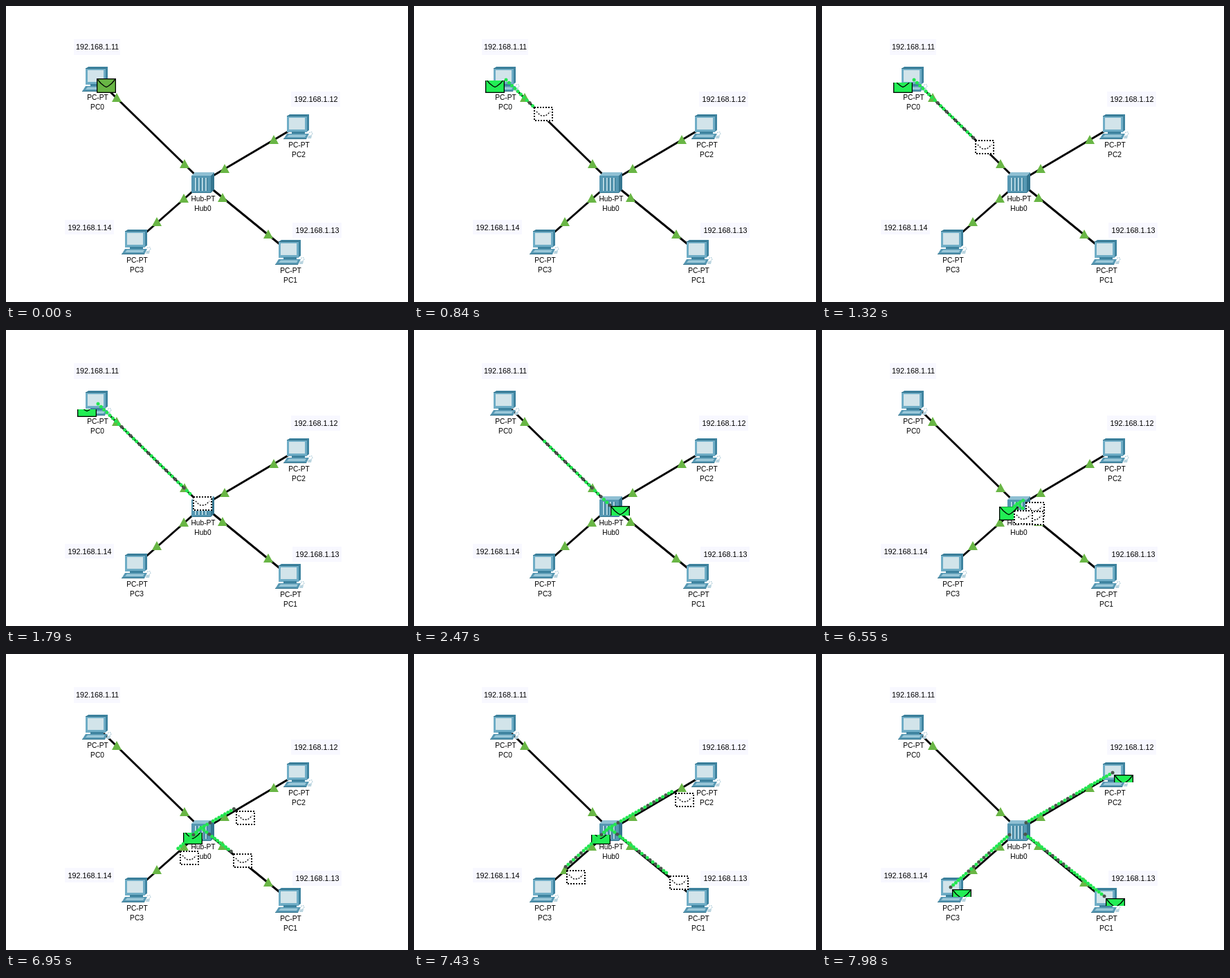
Animation of 581x429 px, one loop 8 s. Source, as an HTML page with a canvas:

```html
<!DOCTYPE html>
<html lang="en">
<head>
<meta charset="utf-8">
<title>Hub broadcast</title>
<style>
html, body { margin: 0; width: 100%; height: 100%; overflow: hidden; background: #fff; }
canvas { display: block; }
</style>
</head>
<body>
<canvas id="stage" width="581" height="429"></canvas>
<script>
const ctx = document.getElementById('stage').getContext('2d');
const LOOP = 8000, STEP = 67.85;
const BRIGHT = '#22ee55', LEAF = '#69b645';

const pcs = [
  { name: 'PC0', x: 131, y: 105, ip: '192.168.1.11', note: [98, 48, 67, 23] },
  { name: 'PC2', x: 422, y: 174, ip: '192.168.1.12', note: [412, 124, 71, 22] },
  { name: 'PC1', x: 410, y: 356, ip: '192.168.1.13', note: [414, 314, 71, 22] },
  { name: 'PC3', x: 188, y: 341, ip: '192.168.1.14', note: [85, 310, 71, 21] }
];
const lights = [[160, 133], [258, 229], [316, 236], [387, 194], [257, 279], [218, 313], [313, 278], [379, 331]];

// Packet positions are the top-left corner of the envelope.
const pc0 = [131, 105], hub = [284, 255];
const targets = [[422, 175], [410, 354], [188, 341]];

const mix = (a, b, p) => a + (b - a) * p;
const clamp = v => Math.max(0, Math.min(1, v));

function poly(fill, ...pts) {
  ctx.beginPath();
  pts.forEach(([x, y]) => ctx.lineTo(x, y));
  ctx.closePath();
  ctx.fillStyle = fill;
  ctx.fill();
}

function box(fill, x, y, w, h) {
  ctx.fillStyle = fill;
  ctx.fillRect(x, y, w, h);
}

function line(color, width, ...pts) {
  ctx.beginPath();
  pts.forEach(([x, y]) => ctx.lineTo(x, y));
  ctx.strokeStyle = color;
  ctx.lineWidth = width;
  ctx.stroke();
}

function text(str, x, y, size) {
  ctx.font = size + 'px "Liberation Sans", Arial, sans-serif';
  ctx.textAlign = 'center';
  ctx.fillStyle = '#000';
  ctx.fillText(str, x, y);
}

function drawPc({ name, x, y, ip, note }) {
  const [nx, ny, nw, nh] = note;
  box('#f8f8ff', nx, ny, nw, nh);
  text(ip, nx + nw / 2 + 0.5, ny + 15, 10.8);
  ctx.save();
  ctx.translate(x, y);
  poly('#3e839f', [-15, -15], [-12, -17], [16, -17], [16, 6], [13, 8], [-15, 8]);
  box('#6fadc6', -16, -15, 29, 24);
  box('#d2e4ea', -13, -12, 23, 17);
  line('#2f7089', 1, [-16, -14.5], [13, -14.5]);
  box('#3e839f', -9, 8, 19, 3);
  poly('#5798b3', [-16, 11], [16, 11], [12, 19], [-21, 19]);
  poly('#9bc8d9', [-13, 12.5], [12, 12.5], [10, 16], [-16, 16]);
  line('#2f7089', 1, [-21, 18.5], [12, 18.5]);
  ctx.setLineDash([2, 1]);
  line('#9fc3d3', 1, [16, 9.5], [20, 8.5], [21, 12], [18, 14]);
  ctx.setLineDash([]);
  poly('#b9d4df', [15, 14], [20, 14], [19, 18], [14, 18]);
  ctx.restore();
  text('PC-PT', x + 1.5, y + 31, 10.2);
  text(name, x + 1, y + 45, 10.2);
}

function drawHub() {
  poly('#8fc0d3', [268, 246], [273, 241], [301, 241], [296, 246]);
  poly('#34758f', [296, 246], [301, 241], [301, 266], [296, 271]);
  box('#5597b2', 268, 246, 28, 25);
  for (let x = 273; x < 290; x += 5) {
    box('#b4d6e2', x, 249, 2, 19);
    box('#347690', x + 2, 249, 1, 19);
  }
  line('#347690', 1, [268, 270.5], [296, 270.5]);
  text('Hub-PT', 285, 283, 10.2);
  text('Hub0', 284.5, 297, 10.2);
}

function drawNetwork() {
  box('#fff', 0, 0, 581, 429);
  line('#000', 3, [141, 115], [285, 256]);
  line('#000', 3, [284, 255], [421, 174]);
  line('#000', 3, [284, 254], [410, 357]);
  line('#000', 3, [284, 256], [188, 341]);
  pcs.forEach(drawPc);
  drawHub();
  lights.forEach(([x, y]) => poly(LEAF, [x, y - 7], [x + 7, y + 6], [x - 7, y + 6]));
}

// Shows only the rows of the envelope between top and bottom.
function envelope(x, y, fill, top = 0, bottom = 21, sealed = false) {
  ctx.save();
  ctx.translate(Math.round(x), Math.round(y));
  ctx.beginPath();
  ctx.rect(0, Math.round(top), 28, Math.round(bottom - top));
  ctx.clip();
  box(fill, 0, 0, 28, 21);
  if (sealed) {
    poly('#62a558', [1, 20], [10, 11], [18, 11], [27, 20]);
    line('#000', 1, [1, 20], [10, 11]);
    line('#000', 1, [27, 20], [18, 11]);
  }
  line('#000', 1.3, [1, 1], [6, 7], [11, 11], [14, 12.5], [17, 11], [22, 7], [27, 1]);
  ctx.strokeRect(0.65, 0.65, 26.7, 19.7);
  ctx.restore();
}

function ghost(x, y) {
  ctx.save();
  ctx.translate(Math.round(x), Math.round(y));
  box('#fff', 0, 0, 28, 21);
  ctx.setLineDash([2, 2]);
  ctx.lineWidth = 2;
  ctx.strokeStyle = '#000';
  ctx.strokeRect(1, 1, 26, 19);
  line('#000', 1.3, [4, 7], [8, 11], [11, 13], [17, 13], [20, 11], [24, 7]);
  ctx.restore();
}

function trail([x0, y0], [x1, y1], from, to, gap, isDark) {
  const n = Math.round(Math.hypot(x1 - x0, y1 - y0) / gap);
  for (let i = 0; i <= n; i++) {
    const p = i / n;
    if (p < from || p > to) continue;
    ctx.beginPath();
    ctx.arc(mix(x0, x1, p), mix(y0, y1, p), 2.5, 0, 7);
    ctx.fillStyle = isDark(i, n) ? '#49564c' : '#22e650';
    ctx.fill();
  }
}

// f runs 0..1 while the packet travels and 1..2 while it is received.
function send(start, ends, f, erased, drawTrail) {
  const p = clamp(f), [sx, sy] = start;
  if (f < 1) envelope(sx - 28, sy, BRIGHT, 10.5 * f);
  ends.forEach(end => drawTrail(start, end, erased, p));
  ends.forEach(([ex, ey]) => {
    if (f < 1) ghost(mix(sx, ex, p), mix(sy, ey, p));
    else envelope(ex, ey, BRIGHT, 0, 10.5 * f);
  });
}

function uplinkTrail(a, b, from, to) {
  trail([133, 107], [283, 254], from, to, 6, (i, n) => i > 5 && i % 3 === 2 || i === n - 3);
}

function downlinkTrail([ax, ay], [bx, by], from, to) {
  trail([ax - 2, ay - 3], [bx - 2, by - 3], from, to, 5,
    (i, n) => i === 3 || i === n || i > 9 && i < 20 && i % 2 === 1);
}

function draw(t) {
  drawNetwork();
  const step = start => Math.floor((t - start + 8) / STEP);
  if (t < 500) {
    envelope(...pc0, LEAF);
  } else if (t < 3350) {
    const f = (step(500) + 1) / 22;
    send(pc0, [hub], f, f - 1, uplinkTrail);
  } else if (t < 6550) {
    envelope(...hub, BRIGHT, 0, 21, true);
  } else {
    const f = (step(6550) + 1.5) / 21.6;
    send(hub, targets, f, f < 1 ? 0 : f - 0.95, downlinkTrail);
  }
}

function tick() {
  draw(performance.now() % LOOP);
  requestAnimationFrame(tick);
}
tick();
</script>
</body>
</html>
```
